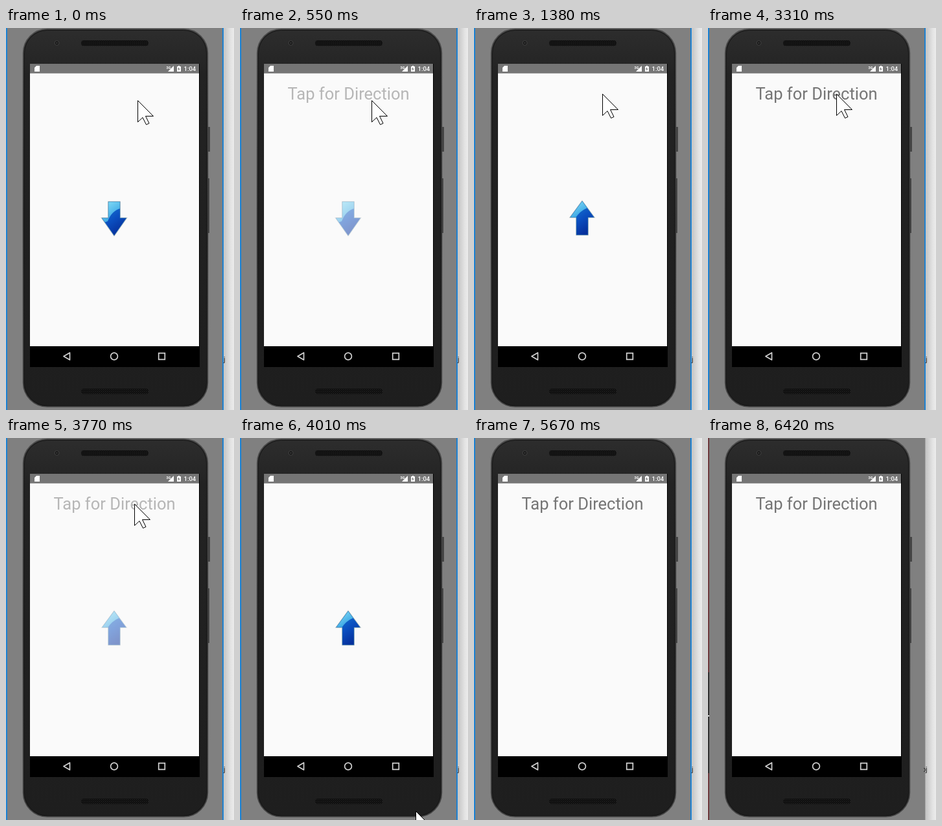
Animation, 352 px wide and 587 px high, one loop 6440 ms. Source, as an HTML page:

```html
<!DOCTYPE html>
<html lang="en">
<head>
<meta charset="utf-8">
<title>Tap for Direction</title>
<style>
  html, body { margin: 0; width: 100%; height: 100%; overflow: hidden; background: #808080; }
  svg { display: block; width: 352px; height: 587px; }
  text { font-family: Roboto, sans-serif; }
</style>
</head>
<body>
<svg viewBox="0 0 352 587">
  <defs>
    <linearGradient id="shade"><stop stop-color="#c4c4c4"/><stop offset=".7" stop-color="#e4e4e4"/><stop offset="1" stop-color="#ebebeb"/></linearGradient>
    <linearGradient id="body" x2="0" y2="1"><stop stop-color="#2d2d2d"/><stop offset=".12" stop-color="#232323"/><stop offset="1" stop-color="#1e1e1e"/></linearGradient>
    <linearGradient id="rim" x2="0" y2="1"><stop stop-color="#505050"/><stop offset=".5" stop-color="#363636"/><stop offset="1" stop-color="#484848"/></linearGradient>
    <linearGradient id="gloss" x2=".6" y2="1"><stop stop-color="#8fe6fa"/><stop offset="1" stop-color="#2d9be0"/></linearGradient>
    <linearGradient id="deep" x2=".5" y2="1"><stop stop-color="#1b86d8"/><stop offset=".6" stop-color="#0b4fc0"/><stop offset="1" stop-color="#06309c"/></linearGradient>
    <pattern id="mesh" width="3" height="3" patternUnits="userSpaceOnUse"><path fill="#0c0c0c" d="M0 0h3v3h-3z"/><path fill="#2c2c2c" d="M0 0h1v1h-1zM1.5 1.5h1v1h-1z"/></pattern>
    <path id="downShape" d="M158 267H176V292H186L167 319 148 292H158Z"/>
    <path id="upShape" d="M167 266 185.500 291H176V318H158V291H148.500Z"/>
    <clipPath id="downClip"><use href="#downShape"/></clipPath>
    <clipPath id="upClip"><use href="#upShape"/></clipPath>
    <clipPath id="edgeClip"><path d="M333 500h19v20h-19z"/></clipPath>
  </defs>

  <path fill="#808080" d="M0 0h336v587H0z"/>
  <path fill="url(#shade)" d="M336 0h16v587h-16z"/>
  <path id="focus" fill="#1e82d2" d="M0 0h2v587H0zM334 0h2v587h-2z"/>
  <g id="blur">
    <path fill="#6e3c40" d="M0 0h2v587H0z"/>
    <path fill="#333" d="M0 360h2v155H0z"/>
    <path fill="#ddd" d="M0 426h2v2H0z"/>
    <path fill="#a8a8a8" d="M335 0h1v587h-1z"/>
  </g>
  <g font-size="11" fill="#222" clip-path="url(#edgeClip)">
    <text id="oh" x="330" y="513">o</text><text x="336" y="513">j</text>
  </g>

  <path fill="#454545" d="M311 152h4v38h-4zM312 231h2v84h-2z"/>
  <rect x="26.500" y="1.500" width="285" height="580.500" rx="37" fill="url(#body)" stroke="url(#rim)" stroke-width="1.500"/>
  <rect x="28.500" y="3.500" width="281" height="576.500" rx="35" fill="none" stroke="#181818"/>
  <rect x="116" y="19" width="104" height="8.500" rx="4" fill="url(#mesh)"/>
  <rect x="116" y="554" width="104" height="8.500" rx="4" fill="url(#mesh)"/>
  <circle cx="78.500" cy="23" r="3.500" fill="#1a1a1a" stroke="#414141"/>
  <circle cx="78.500" cy="23" r="1" fill="#444"/>

  <path d="M37 55h262v466H37z"/>
  <path fill="#757575" d="M37 55h261v14.500H37z"/>
  <path fill="#fafafa" d="M37 69.500h261V489H37z"/>
  <g fill="#fff">
    <path d="M47 58h5v9h-8v-6z"/>
    <path d="M259 58v9h-9z"/>
    <path d="M264 59h2v-1h2v1h2v8h-6z"/>
    <text x="247.500" y="63" font-size="5.500" font-weight="700">3G</text>
    <text x="274.500" y="66" font-size="9.500" font-weight="500">1:04</text>
  </g>
  <path fill="#757575" d="M267 60l-2 3.500h1.500v2.500l2-3.500H267z"/>
  <g fill="none" stroke="#d2d2d2" stroke-width="1.700">
    <path d="M98.500 499v11L89 504.500z" stroke-linejoin="round"/>
    <circle cx="167" cy="504.500" r="5.400"/>
    <path d="M235.700 499.700h9.600v9.600h-9.600z"/>
  </g>

  <text id="label" x="73.500" y="109.500" font-size="25.500" fill="#757575">Tap for Direction</text>
  <g id="down">
    <use href="#downShape" fill="#bbb" stroke="#d0d0d0" stroke-width="2"/>
    <g clip-path="url(#downClip)">
      <path fill="url(#deep)" d="M148 266h38v54h-38z"/>
      <path fill="url(#gloss)" d="M148 266h29v11Q163 281 157 297L148 300z"/>
    </g>
    <use href="#downShape" fill="none" stroke="#2b7bb0" stroke-width=".6"/>
  </g>
  <g id="up">
    <use href="#upShape" fill="#bbb" stroke="#d0d0d0" stroke-width="2"/>
    <g clip-path="url(#upClip)">
      <path fill="url(#deep)" d="M148 265h38v54h-38z"/>
      <path fill="url(#gloss)" d="M148 265h28v11Q163 281 156 293H148z"/>
    </g>
    <use href="#upShape" fill="none" stroke="#2b7bb0" stroke-width=".6"/>
  </g>
  <path id="cursor" d="M.5 .5V33.500L8 26.500 13.500 37.500 18 35.500 12.500 24.500H24.500Z" fill="#fff" stroke="#000"/>
</svg>
<script>
const LOOP = 6440;
const el = id => document.getElementById(id);
const show = (id, amount) => el(id).setAttribute('opacity', amount);

// [start, label opacity]; the arrow takes the rest
const fades = [[0, 0], [550, .5], [680, 1], [1260, .5], [1380, 0], [3310, 1], [3770, .5], [3890, 0], [5670, 1]];
// [start, x, y]; no position means the pointer is off stage
const pointer = [
  [0, 203, 111], [830, 201, 111], [980, 198, 101], [3890, 240, 400], [4010, 271, 573],
  [4140, 276, 585], [4290], [4570, 323, 567], [4720, 325, 567], [4840, 326, 574], [4990]
];
const at = (steps, t) => steps.findLast(s => s[0] <= t);

function draw(now) {
  const t = now % LOOP;
  const label = at(fades, t)[1];
  const [, x = -99, y = -99] = at(pointer, t);
  const blurred = t >= 6420 ? 1 : 0;
  show('label', label);
  show('down', t < 1000 ? 1 - label : 0);
  show('up', t < 1000 ? 0 : 1 - label);
  show('focus', 1 - blurred);
  show('blur', blurred);
  show('oh', blurred);
  el('cursor').setAttribute('transform', `translate(${x} ${y})`);
}

const start = performance.now();
function tick() {
  draw(performance.now() - start);
  requestAnimationFrame(tick);
}
tick();
</script>
</body>
</html>
```
